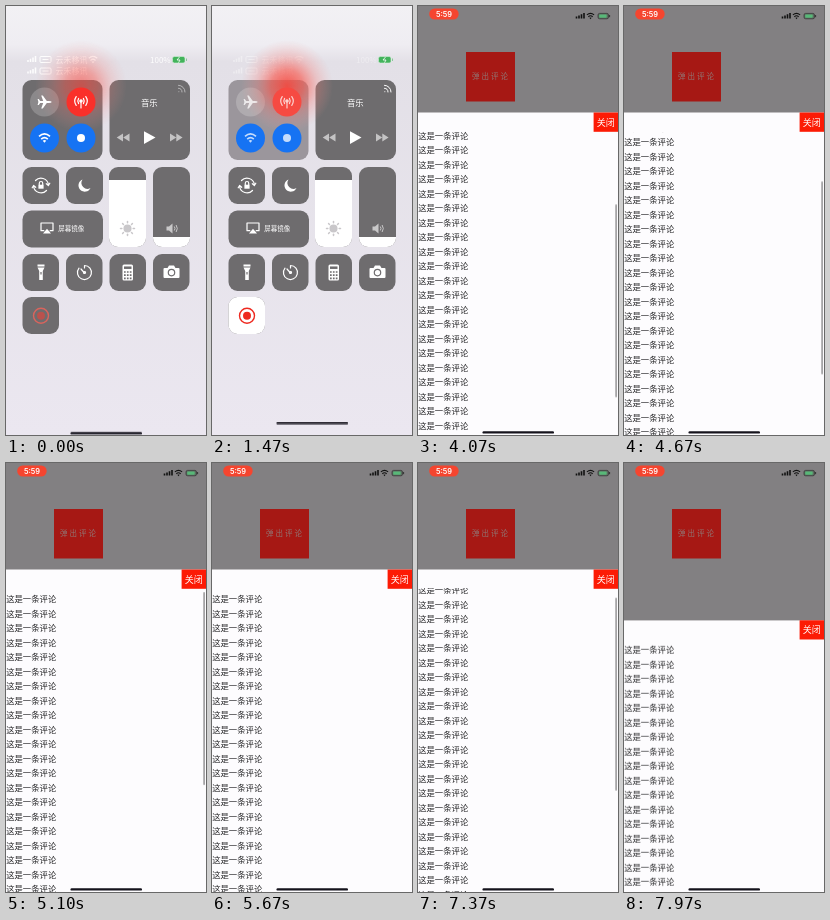
These frames come from a looping animation (200x429 px, 8 s). An HTML page:

```html
<!DOCTYPE html>
<html lang="zh-CN">
<head>
<meta charset="utf-8">
<title>评论面板</title>
<style>
html, body { margin: 0; width: 100%; height: 100%; overflow: hidden; background: #fff; }
svg { display: block; width: 100%; height: 100%; }
text { font-family: "Noto Sans CJK SC", "Noto Sans CJK", "Noto Sans", sans-serif; font-weight: 500; }
.clock { font: 600 7.4px Inter, sans-serif; }
.white { fill: #fff; }
.line { fill: none; stroke: #fff; stroke-width: 1.2; stroke-linecap: round; stroke-linejoin: round; }
.mid { text-anchor: middle; }
#tiles { transform-origin: 100px 200px; }
</style>
</head>
<body>
<svg viewBox="0 0 200 429" preserveAspectRatio="none">
  <defs>
    <linearGradient id="haze" x2="0" y2="1">
      <stop offset="0" stop-color="#f2f1f4"/>
      <stop offset=".09" stop-color="#efedf2"/>
      <stop offset=".13" stop-color="#e3e0e7"/>
      <stop offset="1" stop-color="#ebe7f0"/>
    </linearGradient>
    <radialGradient id="red">
      <stop offset="0" stop-color="#f8463c" stop-opacity=".9"/>
      <stop offset=".35" stop-color="#f8564c" stop-opacity=".65"/>
      <stop offset=".65" stop-color="#f87a74" stop-opacity=".3"/>
      <stop offset="1" stop-color="#f8a09c" stop-opacity="0"/>
    </radialGradient>
    <clipPath id="listClip"><rect y="125.5" width="200" height="310"/></clipPath>
    <clipPath id="brightClip"><rect x="103" y="161" width="37" height="80" rx="9"/></clipPath>
    <clipPath id="volumeClip"><rect x="147" y="161" width="37" height="80" rx="9"/></clipPath>
    <g id="wifi">
      <path d="M-5-2Q0-6.5 5-2M-3 .5Q0-2.2 3 .5" fill="none" stroke="currentColor" stroke-width="1.5"/>
      <path d="M-1.6 2Q0 .8 1.6 2L0 3.8Z" fill="currentColor"/>
    </g>
  </defs>

  <!-- App page -->
  <rect width="200" height="429" fill="#fff"/>
  <rect id="dim" width="200" height="429" fill="#828082"/>
  <rect id="square" x="48" y="46" width="49" height="49.5"/>
  <text id="label" x="54" y="73" font-size="7.5" letter-spacing="2">弹出评论</text>

  <g id="sheet">
    <rect y="106.5" width="200" height="330" fill="#fdfcfe"/>
    <g clip-path="url(#listClip)"><g id="list" font-size="8.35" fill="#28282a"></g></g>
    <rect id="bar" x="197.3" y="129" width="1.6" height="193" rx=".8" fill="#9b9a9c"/>
    <rect x="175.6" y="106.5" width="24.4" height="19.3" fill="#fc1b05"/>
    <text class="white mid" x="187.8" y="119.5" font-size="9">关闭</text>
  </g>

  <g id="status">
    <rect x="11.2" y="2.5" width="29.5" height="11" rx="5.5" fill="#f5452f"/>
    <text class="white mid clock" x="26" y="10.8">5:59</text>
    <path d="M158.5 12.5v-2M161 12.5v-3M163.5 12.5v-4.2M166 12.5v-5.5" stroke="#111" stroke-width="1.6"/>
    <use href="#wifi" color="#111" transform="translate(172.5 10.4) scale(.72)"/>
    <rect x="180" y="7.4" width="10.5" height="5.4" rx="1.6" fill="#5c6b60" stroke="#333" stroke-width=".7"/>
    <rect x="181.2" y="8.5" width="7.5" height="3.2" rx=".6" fill="#58b878"/>
    <path d="M191.6 9v2.2" stroke="#333"/>
  </g>

  <!-- Control centre -->
  <rect id="veil" width="200" height="429" fill="url(#haze)"/>
  <g id="carrier" class="white" font-size="8">
    <g id="carrierLine">
      <path d="M22 56v-2M24.5 56v-3.2M27 56v-4.5M29.5 56v-6" stroke="#fff" stroke-width="1.5"/>
      <rect x="34" y="50.5" width="11" height="6" rx="1" fill="none" stroke="#fff"/>
      <path d="M36.5 53.5h6" stroke="#fff"/>
      <text x="49.5" y="56.7">云禾移讯</text>
    </g>
    <use href="#carrierLine" y="11.5"/>
    <use href="#wifi" color="#fff" transform="translate(87 54) scale(.85)"/>
    <text x="144" y="56.7">100%</text>
  </g>
  <g id="battery">
    <rect x="166.5" y="50.5" width="12.5" height="6.5" rx="1.8" fill="#42b35b" stroke="#d9efdd" stroke-width=".6"/>
    <path d="M180.5 52.5v2.5" stroke="#8ac79a"/>
    <path d="M173.5 51l-2.5 3h3l-1.5 2.7" fill="none" stroke="#fff" stroke-width=".8"/>
  </g>
  <g id="tiles">
    <g id="cards" fill="#6e6c6e"></g>
    <rect id="network" x="16.5" y="74" width="80" height="80" rx="9"/>
    <circle cx="38.5" cy="96" r="14.5" fill="#fff" fill-opacity=".2"/>
    <circle id="glow" cx="75" cy="80" r="46" fill="url(#red)"/>
    <circle id="cell" cx="75" cy="96" r="14.5"/>
    <circle cx="38.5" cy="132" r="14.5" fill="#1673f3"/>
    <circle cx="75" cy="132" r="14.5" fill="#1673f3"/>
    <g id="radios">
      <path class="white" transform="translate(38.8 96)" d="M7 0Q6.5-1.1 4-1.1H2L-2-6.5h-1.6L-1.6-1.1H-4.6L-6-3h-1.2L-6.4 0-7.2 3H-6L-4.6 1.1H-1.6L-3.6 6.5H-2L2 1.1H4Q6.5 1.1 7 0Z"/>
      <g class="line" transform="translate(75 95)">
        <path d="M0 0V7M-2.4-2.6Q-4 0-2.4 2.6M2.4-2.6Q4 0 2.4 2.6M-4.8-4.4Q-7.8 0-4.8 4.4M4.8-4.4Q7.8 0 4.8 4.4"/>
        <circle r="1.2" class="white"/>
      </g>
      <use href="#wifi" color="#fff" transform="translate(38.5 132.5) scale(1.1)"/>
      <circle class="white" cx="75" cy="132" r="4"/>
    </g>

    <text class="white mid" x="143.3" y="100.2" font-size="8.4">音乐</text>
    <path id="cast" class="line" style="stroke-width:1" d="M172.5 82.3A3.6 3.6 0 0 1 176 86M172.5 79.3A6.5 6.5 0 0 1 179 86M172.8 85.7h.1"/>
    <path class="white" d="M138 125.2V138L149.5 131.6Z"/>
    <path fill="#c4c3c4" d="M117 127.5v8l-6.3-4ZM123.5 127.5v8l-6.3-4ZM164 127.5v8l6.3-4ZM170.3 127.5v8l6.3-4Z"/>

    <g class="line" transform="translate(35 179.5)">
      <path d="M-5.5-5A7.5 7.5 0 0 1 7.4-1M5.5 5A7.5 7.5 0 0 1-7.4 1M5.3-1.8L7.4 0 8.8-2.3M-5.3 1.8L-7.4 0-8.8 2.3"/>
      <rect x="-2.6" y="-.8" width="5.2" height="4" class="white" stroke="none"/>
      <path d="M-1.7-1V-2.3A1.7 1.7 0 0 1 1.7-2.3V-1"/>
    </g>
    <path class="white" d="M76.5 173.5A6.3 6.3 0 1 0 84.5 182 6 6 0 0 1 76.5 173.5Z"/>

    <g class="line" transform="translate(41 222)">
      <path d="M-3.2 2.7H-6V-5H6V2.7H3.2"/>
      <path d="M-4 5.5L0 .7 4 5.5Z" class="white" stroke="none"/>
    </g>
    <text class="white" x="52.3" y="224.8" font-size="6.5">屏幕镜像</text>

    <rect class="white" x="103" y="174" width="37" height="68" clip-path="url(#brightClip)"/>
    <rect class="white" x="147" y="231" width="37" height="11" clip-path="url(#volumeClip)"/>
    <g transform="translate(121.5 222.5)" fill="#c9c7ca" stroke="#c9c7ca" stroke-width="1.5" stroke-linecap="round">
      <circle r="3.3"/><g id="rays"></g>
    </g>
    <g transform="translate(165.5 222.5)">
      <path d="M-5-2h2.5L1-5V5L-2.5 2H-5Z" fill="#c9c8c9"/>
      <path d="M2.8-2Q4.2 0 2.8 2M4.6-3.5Q7 0 4.6 3.5" fill="none" stroke="#c9c8c9"/>
    </g>

    <path class="white" d="M31.5 258.5h7v2h-7ZM31.5 261.5h7l-1.7 3.5v9h-3.6v-9Z"/>
    <path d="M35 266v2.5" stroke="#6e6c6e" stroke-width="1.2"/>
    <g class="line" transform="translate(78.5 266.5)">
      <path d="M0-7A7 7 0 1 1-5.5-4.4M0-7V-4.5M-3.5-3.5L0 .5"/><circle r="1"/>
    </g>
    <rect class="white" x="116.5" y="258.5" width="10.5" height="16" rx="1.5"/>
    <path stroke="#6e6c6e" stroke-width="1.7" stroke-dasharray="1.7 1.2" d="M118 266h8M118 269.2h8M118 272.3h8"/>
    <path stroke="#6e6c6e" stroke-width="2.5" d="M118 261.7h7.5"/>
    <path class="white" d="M158.5 262h3l1.5-2.5h5l1.5 2.5h3q1 0 1 1v8q0 1-1 1h-14q-1 0-1-1v-8q0-1 1-1Z"/>
    <circle cx="165.5" cy="266.6" r="3.2" fill="none" stroke="#6e6c6e" stroke-width="1.2"/>

    <rect id="recordTile" class="white" x="16.5" y="291" width="36.5" height="37" rx="9"/>
    <circle id="ring" cx="35" cy="309.7" r="7.5" fill="none" stroke-width="1.4"/>
    <circle id="dot" cx="35" cy="309.7" r="4"/>
  </g>
  <rect id="home" x="64.5" y="425.2" width="71.5" height="2.4" rx="1.2" fill="#15131c"/>
</svg>

<script>
const LOOP = 8000, ROW = 14.5, BAR_RATIO = .64;
const $ = id => document.getElementById(id);

function add(parent, tag, attrs, text = '') {
  const node = document.createElementNS('http://www.w3.org/2000/svg', tag);
  for (const key in attrs) node.setAttribute(key, attrs[key]);
  node.textContent = text;
  $(parent).append(node);
}

for (let i = 0; i < 33; i++)
  add('list', 'text', { x: .2, y: 139.4 + i * ROW }, '这是一条评论');

for (let a = 0; a < 360; a += 45)
  add('rays', 'path', { d: 'M0-5.7V-7', transform: `rotate(${a})` });

const card = (x, y, width, height) => add('cards', 'rect', { x, y, width, height, rx: 9 });
card(103.5, 74, 80.5, 80);
card(16.5, 161, 36.5, 37);
card(60, 161, 37, 37);
card(16.5, 204.5, 80.5, 37);
card(103, 161, 37, 80);
card(147, 161, 37, 80);
[16.5, 60, 103.5, 147].forEach(x => card(x, 248, 36.5, 37));
card(16.5, 291, 36.5, 37);

// Steps are [time, value, easing towards the next step].
function play(id, steps, frame) {
  const all = [[0, steps[0][1]], ...steps, [LOOP, steps.at(-1)[1]]];
  $(id).animate(
    all.map(([t, v, easing = 'linear']) => ({ offset: t / LOOP, easing, ...frame(v) })),
    { duration: LOOP, iterations: Infinity });
}
const fade = (id, steps) => play(id, steps, opacity => ({ opacity }));
const slide = (id, steps) => play(id, steps, y => ({ transform: `translateY(${y}px)` }));
const paint = (id, prop, steps) => play(id, steps, v => ({ [prop]: v }));

const OUT = 'cubic-bezier(.2,.7,.2,1)', SOFT = 'ease-in-out';

// Recording starts, then the control centre closes.
fade('recordTile', [[250, 0], [500, 1]]);
paint('ring', 'stroke', [[200, '#d9645d'], [500, '#ee2a20']]);
paint('dot', 'fill', [[200, '#b9524d'], [500, '#ee2a20']]);
fade('cast', [[900, .5], [1400, 1]]);
fade('radios', [[1000, 1], [1470, .75]]);
paint('cell', 'fill', [[1000, '#fa302a'], [1470, '#f64a42']]);
paint('network', 'fill', [[1000, '#6e6c6e'], [1470, '#9b969c']]);
fade('glow', [[1100, .7], [1470, 1], [1700, 0]]);
fade('carrier', [[1150, .95], [1470, .4], [1600, 0]]);
fade('battery', [[1470, 1], [1640, 0]]);
fade('veil', [[1480, 1, SOFT], [1720, 0]]);
fade('tiles', [[1490, 1, SOFT], [1950, 0]]);
play('tiles', [[1490, 1, SOFT], [1950, .97]], s => ({ transform: `scale(${s})` }));
fade('status', [[1600, 0], [1850, 1]]);
slide('home', [[950, .8, OUT], [1350, -9.5], [1480, -9.5, SOFT], [1850, 0]]);

// The comment sheet rises and is later dragged.
const dimming = (from, to) => [[2300, from, OUT], [2600, to]];
fade('dim', dimming(0, 1));
paint('square', 'fill', dimming('#fb1510', '#a61814'));
paint('label', 'fill', dimming('#ffffff', '#927472'));
slide('sheet', [
  [2300, 325, OUT], [2700, 0], [5680, 0, SOFT], [6050, 62, OUT], [6380, 0],
  [7560, 0, SOFT], [7970, 50.8]
]);

const scroll = [
  [3120, 0, OUT], [3750, 112], [3950, 112, SOFT], [4520, 72.5], [4720, 72.5, OUT],
  [5150, 0], [6450, 0, OUT], [6900, 74], [7050, 74, SOFT], [7370, 9], [7500, 0]
];
const scaled = k => scroll.map(([t, v, e]) => [t, v * k, e]);
slide('list', scaled(-1));
slide('bar', scaled(BAR_RATIO));
fade('bar', [
  [3100, 0], [3160, 1], [5200, 1], [5500, 0],
  [6440, 0], [6500, 1], [7520, 1], [7800, 0]
]);
</script>
</body>
</html>
```
